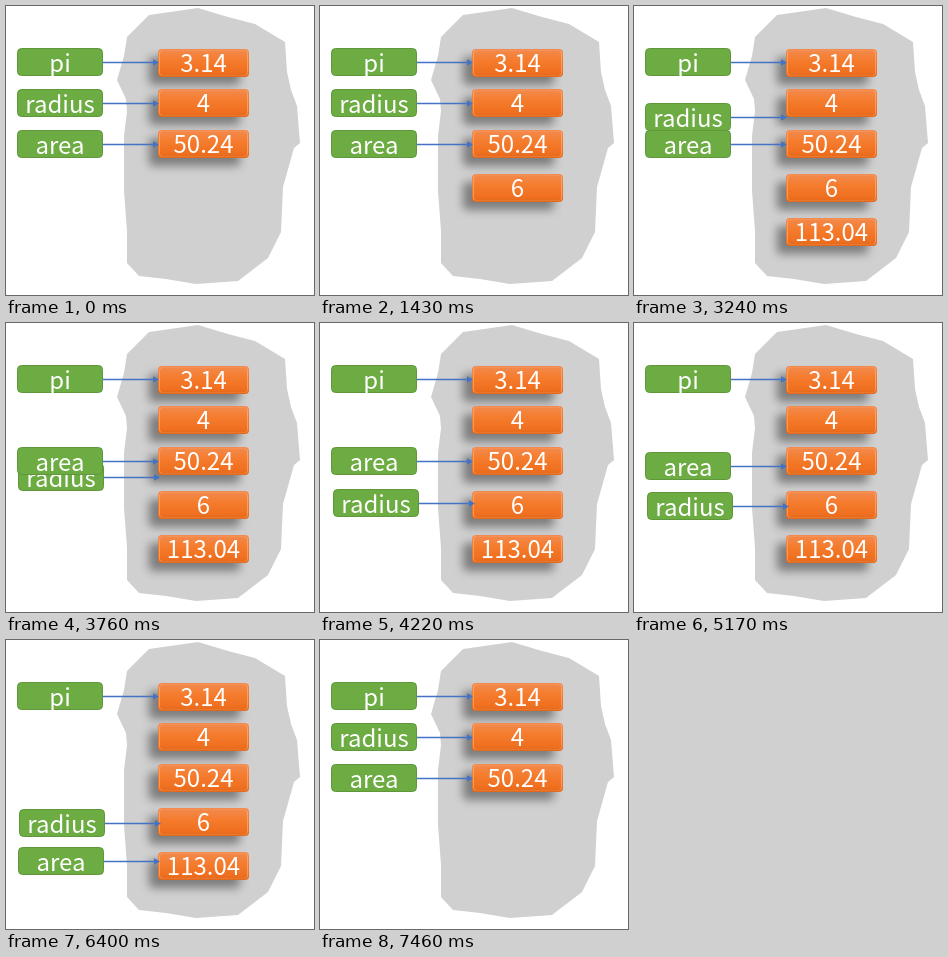
These frames come from a looping animation (308 px wide and 289 px high, 7790 ms). An HTML page with a canvas:

```html
<!DOCTYPE html>
<html lang="en">
<head>
<meta charset="utf-8">
<title>Variables and values</title>
<style>
  html, body { margin: 0; width: 100%; height: 100%; overflow: hidden; background: #fff; }
  canvas { display: block; }
</style>
</head>
<body>
<canvas id="stage" width="308" height="289"></canvas>
<script>
const ctx = document.getElementById('stage').getContext('2d');
const LOOP = 7790;
const RESET = 7460;
const TRAVEL = 86;

const heap = new Path2D(
  'M121 31L143 9L192 2L222 11L249 18L279 36L281 66L285 84L291 100L294 137' +
  'L288 142L277 181L275 226L262 252L232 275L190 278L160 273L133 270L121 257' +
  'L121 225L118 185L118 130L121 105L120 93L111 74L118 50Z');

const values = [
  { text: '3.14', y: 57, from: 0 },
  { text: '4', y: 97, from: 0 },
  { text: '50.24', y: 138, from: 0 },
  { text: '6', y: 182, from: 1430 },
  { text: '113.04', y: 226, from: 2640 }
];

const names = [
  { text: 'pi', y: 56 },
  { text: 'radius', y: 97, start: 2760, span: 1690, dx: 2 },
  { text: 'area', y: 138, start: 4865, span: 1750, dx: 1 }
];

// Constant acceleration to the middle, then constant braking.
function ease(x) {
  x = Math.min(1, Math.max(0, x));
  return x < 0.5 ? 2 * x * x : 1 - 2 * (1 - x) * (1 - x);
}

function box(x, y, w, h, r) {
  ctx.beginPath();
  ctx.roundRect(x, y, w, h, r);
}

function label(text, x, y) {
  ctx.fillStyle = '#fff';
  ctx.fillText(text, x, y + 9);
}

function drawValue({ text, y }) {
  const top = y - 14;
  const fill = ctx.createLinearGradient(0, top, 0, top + 28);
  fill.addColorStop(0, '#f28b50');
  fill.addColorStop(0.4, '#f57c2e');
  fill.addColorStop(0.8, '#f07020');
  fill.addColorStop(1, '#e2681c');

  ctx.save();
  ctx.shadowColor = 'rgba(0,0,0,0.4)';
  ctx.shadowBlur = 10;
  ctx.shadowOffsetX = -9;
  ctx.shadowOffsetY = 8;
  ctx.fillStyle = fill;
  box(152, top, 91, 28, 4);
  ctx.fill();
  ctx.restore();

  // Bevelled rim, brightest at the two ends.
  const rim = ctx.createLinearGradient(152, 0, 243, 0);
  rim.addColorStop(0, 'rgba(255,200,155,0.6)');
  rim.addColorStop(0.06, 'rgba(255,190,140,0.15)');
  rim.addColorStop(0.94, 'rgba(255,190,140,0.15)');
  rim.addColorStop(1, 'rgba(255,200,155,0.6)');
  ctx.lineWidth = 1;
  ctx.strokeStyle = rim;
  box(153.5, top + 1.5, 88, 25, 3);
  ctx.stroke();
  label(text, 197.5, y);
}

function drawName({ text, y, start, span, dx }, t) {
  const p = start ? ease((t - start) / span) : 0;
  ctx.save();
  ctx.translate(Math.round((dx || 0) * p), y + Math.round(TRAVEL * p));

  ctx.strokeStyle = ctx.fillStyle = '#4472c4';
  ctx.lineWidth = 1.6;
  ctx.beginPath();
  ctx.moveTo(97, 0.5);
  ctx.lineTo(148, 0.5);
  ctx.stroke();
  ctx.beginPath();
  ctx.moveTo(147, -2.7);
  ctx.lineTo(153, 0.5);
  ctx.lineTo(147, 3.7);
  ctx.fill();

  box(11.5, -13.5, 85, 27, 4);
  ctx.fillStyle = '#6dab43';
  ctx.fill();
  ctx.strokeStyle = '#5f983b';
  ctx.lineWidth = 1;
  ctx.stroke();
  label(text, 54, 1);
  ctx.restore();
}

function draw(now) {
  const loop = now % LOOP;
  const t = loop < RESET ? loop : 0;
  ctx.fillStyle = '#fff';
  ctx.fillRect(0, 0, 308, 289);
  ctx.fillStyle = '#d0d0d0';
  ctx.fill(heap);
  ctx.font = '300 24px "Noto Sans CJK SC", "Noto Sans CJK JP", "Open Sans", sans-serif';
  ctx.textAlign = 'center';
  for (const v of values) if (t >= v.from) drawValue(v);
  for (const n of names) drawName(n, t);
}

const begin = performance.now();
function tick() {
  draw(performance.now() - begin);
  requestAnimationFrame(tick);
}
tick();
</script>
</body>
</html>
```
